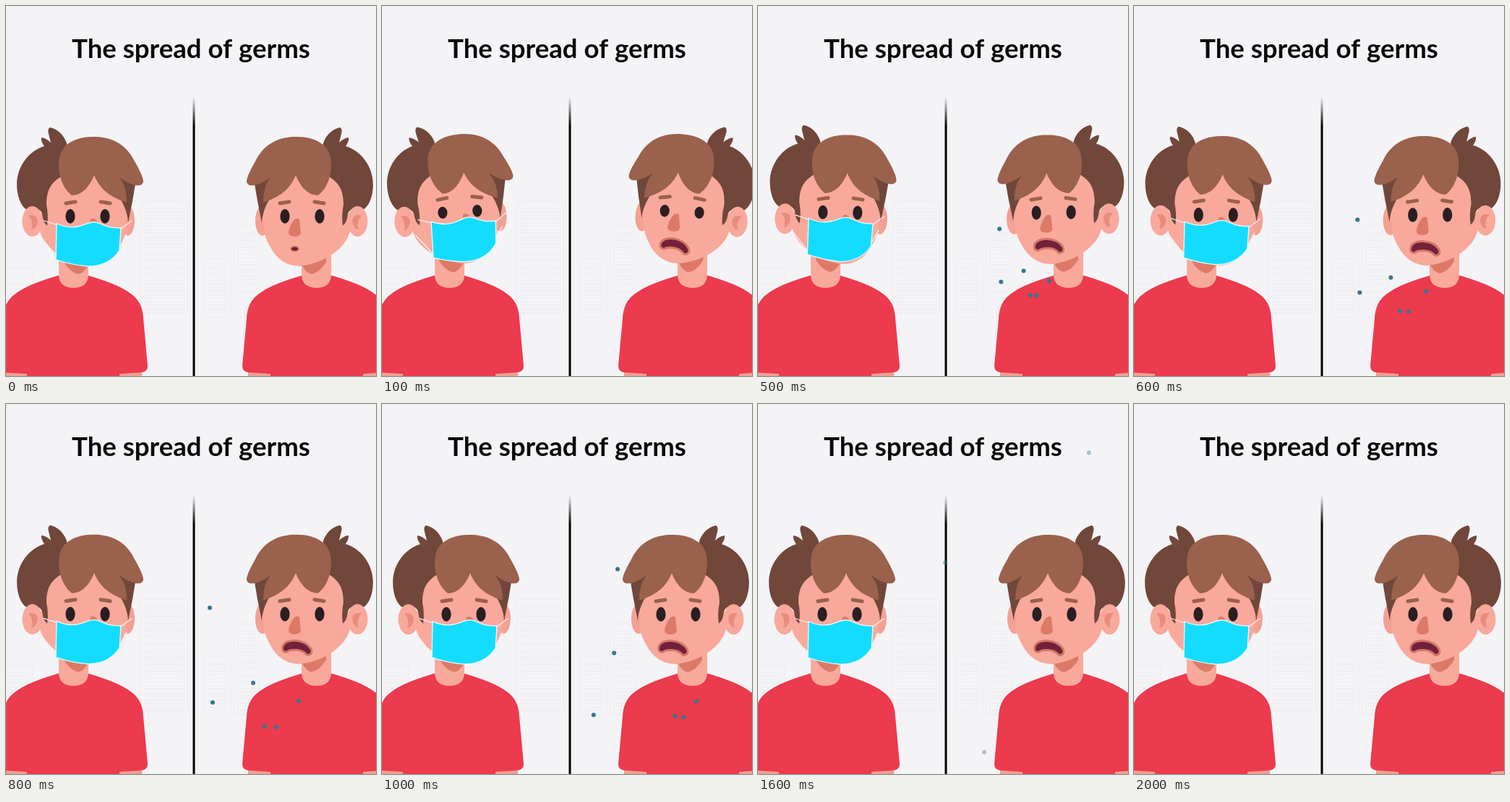
Recreate the animation shown at these times as an HTML page with a canvas. Size 512 px wide and 512 px high, loop 3 s.

```html
<!DOCTYPE html>
<html lang="en">
<head>
<meta charset="utf-8">
<title>The spread of germs</title>
<style>
html, body { margin: 0; width: 100%; height: 100%; overflow: hidden; background: #f4f3f6; }
canvas { display: block; width: 100vw; height: 100vh; }
</style>
</head>
<body>
<canvas id="stage" width="512" height="512"></canvas>
<script>
const ctx = document.getElementById('stage').getContext('2d');
const LOOP = 3000, STEP = 100, LAST = 20;
const SKIN = '#f8a99c', SHADE = '#dc7a67', HAIR = '#9a614d', DARK = '#70473a';
const MOUTH = 'M19 0Q17 -8 3 -8Q-12 -7 -18 3Q-20 9 -14 9Q-8 2 3 2Q12 2 15 5Q20 5 19 0Z';

// The cough bursts from BURST to TURN, then drifts on to DRIFT and beyond.
const BURST = 3, TURN = 8, DRIFT = 13, GONE = 18;
const LIPS = [400, 342];
const GERMS = [
  { turn: [282, 282], end: [392, 148] },
  { turn: [286, 413], end: [303, 456] },
  { turn: [342, 386], end: [290, 282] },
  { turn: [358, 446], end: [477, 411] },
  { turn: [374, 447], end: [482, 413] },
  { turn: [405, 411], end: [480, 412] }
];

const clamp = v => Math.max(0, Math.min(1, v));
const mix = (a, b, u) => a + (b - a) * u;

function shape(d, fill, line, width) {
  const p = new Path2D(d);
  if (fill) { ctx.fillStyle = fill; ctx.fill(p); }
  if (line) { ctx.strokeStyle = line; ctx.lineWidth = width; ctx.stroke(p); }
}

function oval(x, y, rx, ry, fill) {
  ctx.fillStyle = fill;
  ctx.beginPath();
  ctx.ellipse(x, y, rx, ry, 0, 0, 7);
  ctx.fill();
}

// Draws with the pivot (px, py) moved by (dx, dy) and turned.
function moved(px, py, dx, dy, angle, paint) {
  ctx.save();
  ctx.translate(px + dx, py + dy);
  ctx.rotate(angle);
  ctx.translate(-px, -py);
  paint();
  ctx.restore();
}

function mirrored(axis, paint) {
  ctx.save();
  ctx.translate(2 * axis, 0);
  ctx.scale(-1, 1);
  paint();
  ctx.restore();
}

function tower(x, y, w, h) {
  ctx.strokeRect(x, y, w, h);
  for (let i = y + 10; i < y + h; i += 10) ctx.strokeRect(x + 5, i, w - 10, 4);
}

function backdrop() {
  ctx.fillStyle = '#f4f3f6';
  ctx.fillRect(0, 0, 512, 512);
  ctx.strokeStyle = '#ededf0';
  ctx.lineWidth = 1;
  tower(187, 270, 64, 155);
  tower(275, 350, 36, 80);
  tower(316, 304, 34, 126);
  tower(-5, 362, 42, 60);

  const fade = ctx.createLinearGradient(0, 126, 0, 166);
  fade.addColorStop(0, 'rgba(0,0,0,0)');
  fade.addColorStop(1, '#000');
  ctx.fillStyle = fade;
  ctx.fillRect(258.5, 126, 3, 386);

  ctx.fillStyle = '#0b0a0c';
  ctx.font = '700 36.6px Lato, sans-serif';
  ctx.textAlign = 'center';
  ctx.fillText('The spread of germs', 256, 72);
}

function halfShirt() {
  shape('M156 508L188 506V512H156Z', '#f0a092');
  shape('M92 373H114C138 380 160 388 174 399Q189 410 190 432L196 498Q196 506 188 507L157 509V512H92Z', '#ec3a4e');
}

function body(pose) {
  halfShirt();
  mirrored(93, halfShirt);
  shape('M73 335H114V374Q112 390 93 390Q75 390 73 374Z', SKIN);
  moved(0, 0, pose.x, pose.y, 0, () =>
    shape('M80 340H114V358Q107 371 99 371Q87 367 80 354Z', SHADE));
}

function mouth(pose, open) {
  if (!open) {
    oval(123.5, 336, 6.5, 4.2, '#d9806f');
    oval(123.5, 336, 4.5, 2.6, '#6b2236');
    return;
  }
  moved(0, 0, 120, 337 + 22 * pose.tilt, -pose.tilt, () => {
    shape(MOUTH, null, '#d47868', 6);
    shape(MOUTH, '#73203a');
  });
}

function face(pose, open) {
  for (const side of [-1, 1]) {
    const x = 113 + 24 * side;
    shape(`M${x - 6} ${272 - side}L${x + 7} ${272 + side}`, null, HAIR, 5);
    oval(x, 291, 6.6, 10 - 31 * Math.abs(pose.tilt), '#2a1e21');
  }
  shape('M117 295Q122 292 126 298Q132 308 132 314Q131 319 122 319Q115 318 115 313Z', SHADE);
  mouth(pose, open);
}

function mask() {
  shape('M52 297L71 303M47 318L70 347M158 309L174 297M156 336L167 316', null, '#fdeeee', 1.3);
  shape('M70 301Q86 308 100 305C110 303 114 299 122 299C132 299 136 308 159 307L157 338Q142 361 112 360Q90 358 69 351Z', '#14dcff', '#e6fbff', 1.3);
}

function head(pose, masked, open) {
  const { tilt, lift } = pose, lean = Math.max(0, tilt);
  oval(168, 297, 10, 21, '#f4a194');
  shape('M57 235L90 200H150L170 245L168 290Q167 318 158 332Q144 360 116 360Q84 356 62 336Q47 322 46 305Z', SKIN);
  shape('M84 190C81 181 74 171 61 168Q57 170 59 177L62 189Q56 183 49 182Q48 187 53 194C32 200 15 222 15 247C15 262 20 277 29 282Q45 276 50 287Q51 300 57 304Q59 290 56 275C56 253 63 242 84 232Z', DARK);
  oval(36.5, 298, 14, 21, SKIN);
  shape('M31 290Q43 287 44 298Q42 310 35 309Q39 299 31 290Z', '#e88c7e');
  shape('M150 232L179 246L175 270L169 300Q168 278 150 255Z', DARK);

  moved(0, 0, 14 * tilt, lift - 52 * lean, 0, () => face(pose, open));
  shape('M74 232C71 212 75 199 84 192C97 182 110 181 125 181C150 182 168 194 178 215Q189 234 190 242C190 252 174 250 157 237Q168 252 167 272C144 264 130 254 122 234C117 247 107 262 91 262Q78 252 74 232Z', HAIR);
  if (masked) moved(115, 304, 62 * tilt, 1.5 * lift - 45 * lean, -0.47 * tilt, mask);
}

function person(pose, masked, open) {
  body(pose);
  moved(93, 370, pose.x, pose.y, -pose.tilt, () => head(pose, masked, open));
}

// One lean of the head, then a small rebound that dies away.
function cough(k) {
  const rebound = k < 5 ? 0 : Math.exp(5 - k);
  const lean = k < 5 ? 0.155 * Math.sin(Math.PI * clamp(k / 4.7) ** 1.4) : 0;
  return {
    tilt: lean - 0.012 * rebound,
    x: -26 * lean,
    y: -45 * lean - 3 * rebound,
    lift: -2.5 * rebound
  };
}

function germs(k) {
  if (k < BURST) return;
  const burst = 1 - (1 - clamp((k - BURST) / (TURN - BURST))) ** 1.6;
  const drift = Math.max(0, (k - TURN) / (DRIFT - TURN));
  ctx.globalAlpha = clamp((k - 2) / 3) * clamp((GONE - k) / (GONE - DRIFT));
  for (const { turn, end } of GERMS) {
    const [x, y] = LIPS.map((v, a) => mix(v, turn[a], burst) + (end[a] - turn[a]) * drift);
    oval(x, y, 3, 3, '#35798b');
  }
  ctx.globalAlpha = 1;
}

function draw(k) {
  const pose = cough(k);
  backdrop();
  person(pose, true, false);
  mirrored(261.5, () => person(pose, false, k > 0));
  germs(k);
}

ctx.lineCap = 'round';
ctx.lineJoin = 'round';
const start = performance.now();

function tick() {
  const t = (performance.now() - start) % LOOP;
  draw(Math.min(LAST, Math.floor(t / STEP)));
  requestAnimationFrame(tick);
}
tick();
</script>
</body>
</html>
```
